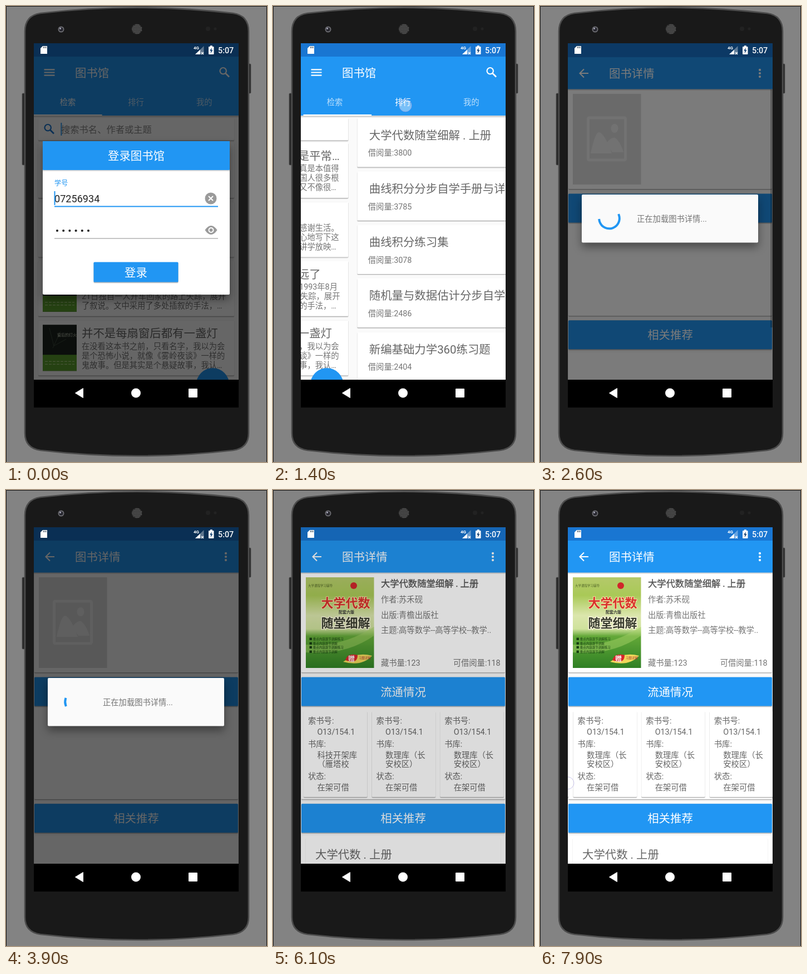
An HTML page that plays this animation: 469x820 px, repeating every 8 s.

```html
<!DOCTYPE html>
<html lang="zh-CN">
<head>
<meta charset="utf-8">
<title>图书馆</title>
<style>
html, body { margin: 0; width: 100%; height: 100%; overflow: hidden; background: #838383; }
svg { display: block; width: 100vw; height: 100vh; }
text { font-family: Roboto, "Noto Sans CJK SC", "Noto Sans CJK", sans-serif; white-space: pre; }
.dialog { filter: drop-shadow(0 8px 8px rgba(0, 0, 0, .4)); }
</style>
</head>
<body>
<svg id="stage" viewBox="0 0 469 820" xmlns="http://www.w3.org/2000/svg"></svg>
<script>
const BLUE = '#2196f3', DARK = '#1976d2', GREY = '#757575', INK = '#666';
const PAGE = 368, STEP = 122.6;

// ---- drawing helpers
const rect = (x, y, w, h, fill, extra = '') =>
  `<rect x="${x}" y="${y}" width="${w}" height="${h}" fill="${fill}" ${extra}/>`;
const circle = (x, y, r, fill, extra = '') =>
  `<circle cx="${x}" cy="${y}" r="${r}" fill="${fill}" ${extra}/>`;
const path = (d, fill, extra = '') => `<path d="${d}" fill="${fill}" ${extra}/>`;
const line = (d, color, width, extra = '') =>
  path(d, 'none', `stroke="${color}" stroke-width="${width}" ${extra}`);
// cy is the optical middle of the line of text
const text = (x, cy, size, fill, str, extra = '') =>
  `<text x="${x}" y="${cy + size * .38}" font-size="${size}" fill="${fill}" ${extra}>${str}</text>`;
const MID = 'text-anchor="middle"';
const group = (id, body, extra = '') => `<g id="${id}" ${extra}>${body}</g>`;
const card = (x, y, w, h, fill = '#fff') =>
  rect(x - .4, y + .4, w + .8, h + 1.8, '#000', 'rx="2" opacity=".1"') +
  rect(x, y + .4, w, h + .8, '#000', 'rx="2" opacity=".2"') +
  rect(x, y, w, h, fill, 'rx="1.5"');
const lens = (x, y, color) =>
  circle(x - 2.3, y - 2.3, 5.7, 'none', `stroke="${color}" stroke-width="2.2"`) +
  line(`M${x + 2},${y + 2}l6.5,6.5`, color, 2.6);
const times = (n, draw) => Array.from({ length: n }, (_, i) => draw(i)).join('');

// ---- phone
function phone() {
  let holes = '';
  for (let i = -3; i <= 3; i++)
    for (let j = -3; j <= 3; j++)
      if (i * i + j * j < 11) holes += circle(235 + i * 2.5 + (j & 1), 41.5 + j * 2.5, .8, '#777');
  return rect(0, 0, 469, 820, '#838383') +
    line('M.5,820V.5H468.5V820', '#111', 1) +
    rect(29, 157, 5, 129, '#2a2a2a', 'rx="1.5" stroke="#555" stroke-width=".8"') +
    rect(435, 104, 5, 53, '#2a2a2a', 'rx="1.5" stroke="#555" stroke-width=".8"') +
    path('M34,46Q34,17 62,13Q235,-7 408,13Q436,17 436,46V768Q436,795 408,799Q235,819 62,799Q34,795 34,768Z',
      '#191919', 'stroke="#4c4c4c" stroke-width="2.6"') +
    circle(99, 42, 5.5, '#6b6b70') + circle(99, 42, 3.6, '#25252d') + circle(97.6, 40.5, 1.5, '#aab') +
    circle(235, 41.5, 9.5, '#303030') + holes +
    circle(363, 41, 4, '#222') + circle(376, 41, 2.6, '#222');
}

function system() {
  return path('M66,72H74V86H62V76Z', '#fff') +
    line('M67.5,73v3M69.8,73v3M72,73v3', '#345', 1) +
    text(337, 75.2, 8, '#fff', '4G', 'font-weight="700"') +
    path('M355.5,72V87H340Z', '#fff', 'opacity=".35"') + path('M349,78.5V87H340Z', '#fff') +
    line('M351,83l4,4m0,-4l-4,4', '#fff', 1.2) +
    rect(364, 73, 9.5, 14, '#fff', 'rx="1"') + rect(366.8, 71.2, 4, 2.5, '#fff') +
    path('M370,75l-4,5.6h2.4l-.8,4.6l4,-6h-2.4z', '#0d3c70') +
    text(381, 79.2, 14.3, '#fff', '5:07', 'font-weight="500"') +
    rect(50, 672, PAGE, 50, '#000') +
    path('M124.5,696L138.5,687.5V704.5Z', '#fff', 'stroke="#fff" stroke-linejoin="round"') +
    circle(233.5, 696, 8.5, '#fff') + rect(328, 688, 16, 16, '#fff', 'rx="1"');
}

// ---- library screen
const books = [
  ['原来安静才好，喧闹是平常…', '许久没有读到这样好看的书，真是本值得',
    '反复读的作品。书中写出了中国人很多根', '深蒂固的想法，读来轻松有趣又不像很…'],
  ['檐下闲谈', '作者用平实的语言写下日常，感谢生活。',
    '每篇都不长，却都真诚，他用心地写下这', '些文字，也记下多年来在各地讲学放映…'],
  ['那天傍晚她独自走太远了', '故事从一桩旧案说起，主角于1993年8月',
    '21日独自一人开车回家的路上失踪，展开', '了叙说。文中采用了多处插叙的手法，…'],
  ['并不是每扇窗后都有一盏灯', '在没看这本书之前，只看名字，我以为会',
    '是个恐怖小说，就像《雾岭夜谈》一样的', '鬼故事。但是其实是个悬疑故事，我认…']
];
const ranking = [
  ['大学代数随堂细解 . 上册', 3800], ['曲线积分分步自学手册与详解…', 3785],
  ['曲线积分练习集', 3078], ['随机量与数据估计分步自学手…', 2486], ['新编基础力学360练习题', 2404]
];

function bookCard([title, ...lines], i) {
  const y = 246 + i * 106.4;
  const cover = i < 2
    ? rect(66, y + 8, 61, 83, 'url(#plain)')
    : rect(66, y + 8, 61, 83, '#1c241d') + rect(66, y + 62, 61, 29, '#5da32c') +
      line(`M70,${y + 74}h53M70,${y + 79}h53`, '#a5cf7c', 1.5, 'stroke-dasharray="5 2"') +
      line(`M78,${y + 14}l8,32l22,-12M98,${y + 20}l-14,30`, '#3c4a3e', 1) +
      text(92, y + 26, 7, '#cfd6c4', '窗后的灯火');
  return card(58, y, 352, 99) + cover + text(136, y + 23, 20.4, INK, title) +
    lines.map((s, k) => text(136, y + 46 + k * 17, 14.3, GREY, s)).join('');
}

function rankCard([title, count], i) {
  const y = 201.5 + i * 96.2;
  return card(58, y, 352, 88) + text(79.5, y + 30.5, 20.4, INK, title) +
    text(77.5, y + 62.5, 14.3, GREY, '借阅量:' + count);
}

function mainScreen() {
  const search = card(58, 201.5, 352, 40) + lens(77.5, 221, DARK) +
    rect(98.5, 210, 1.8, 23, BLUE) + text(99, 222, 16.3, '#8a8a8a', '搜索书名、作者或主题');
  const fab = circle(371.5, 682, 29.6, '#000', 'opacity=".2"') + circle(371.5, 680.6, 29.6, BLUE);
  const tabs = ['检索', '排行', '我的'].map((s, i) =>
    text(111 + i * STEP, 173, 14.3, '#fff', s, `${MID} class="tab"`)).join('');
  return rect(50, 67, PAGE, 605, '#fafafa') +
    group('pager',
      search + books.map(bookCard).join('') + fab +
      group('rank', rect(50, 197, PAGE, 475, '#fafafa') + ranking.map(rankCard).join(''),
        `transform="translate(${PAGE} 0)"`)) +
    rect(50, 197, PAGE, 3, '#000', 'opacity=".15"') +
    rect(50, 67, PAGE, 24.5, DARK) + rect(50, 91, PAGE, 106, BLUE) +
    line('M68.5,114.4h19M68.5,119.5h19M68.5,124.6h19', '#fff', 2.1) +
    text(124, 120, 20.4, '#fff', '图书馆') + lens(392.5, 119, '#fff') + tabs +
    rect(50, 195, STEP, 2.2, '#fff', 'id="marker"');
}

// ---- detail screen
function cover() {
  return rect(59, 157, 122.5, 163, 'url(#green)') +
    path('M59,278Q122,284 181.5,246V262Q130,298 59,292Z', '#a4d267', 'opacity=".5"') +
    text(63, 172, 5.5, '#55682a', '大学课程学习辅导') +
    circle(145, 172, 6, '#d0262b') +
    text(130.5, 203, 22, '#d8322c', '大学代数',
      `${MID} font-weight="900" stroke="#f3e3a4" stroke-width="2" paint-order="stroke"`) +
    text(132, 219, 7, '#333', '配套六版', `${MID} font-weight="700"`) +
    text(130.5, 239, 22, '#3a3d30', '随堂细解',
      `${MID} font-weight="900" stroke="#f6f4d8" stroke-width="3" paint-order="stroke"`) +
    times(4, i => text(65, 268 + i * 7.5, 5.5, '#163d10', '■ 重点内容逐节讲解' + (i & 1 ? '' : '练习'))) +
    path('M126,309Q150,290 178,298Q160,318 126,309Z', '#f0d75a') +
    path('M130,306Q134,292 152,297Q152,314 130,306Z', '#d8262a') +
    text(141, 303.5, 12, '#fff', '赠', `${MID} font-weight="700"`) +
    text(154, 302, 5.5, '#a33', '习题详解');
}

function copyCard(i) {
  const x = 55 + i * STEP;
  const store = i ? ['数理库（长', '安校区）'] : ['科技开架库', '（雁塔校'];
  const rows = [[8, 415, '索书号:'], [24.5, 435, 'O13/154.1'], [8, 457, '书库:'], [24.5, 477, store[0]],
    [24.5, 493, store[1]], [8, 515, '状态:'], [24.5, 535, '在架可借']];
  return card(x, 398, 114.5, 154) + rows.map(([dx, y, s]) => text(x + dx, y, 14.3, INK, s)).join('');
}

const banner = (y, s) => card(51, y, 366, 52, BLUE) + text(234, y + 26.5, 20.4, '#fff', s, MID);

function detailScreen() {
  const blank = rect(59, 157, 122.5, 163, '#dcdcdc') +
    rect(86.5, 200, 67, 76, 'none', 'stroke="#eee" stroke-width="5" rx="2"') +
    '<ellipse cx="134" cy="219" rx="6.5" ry="8" fill="#eee"/>' +
    path('M91,264Q99,226 106,226Q116,228 129,264Z M119,246Q128,234 135,236Q145,244 150,262H130Z', '#eee');
  const info = [[197, '作者:苏禾砚'], [225, '出版:青檐出版社'], [252, '主题:高等数学--高等学校--教学..'], [311, '藏书量:123']];
  const full = cover() +
    text(194, 168, 16.3, '#555', '大学代数随堂细解 . 上册', 'stroke="#555" stroke-width=".4"') +
    info.map(([y, s]) => text(194, y, 14.3, GREY, s)).join('') +
    text(408.5, 311, 14.3, GREY, '可借阅量:118', 'text-anchor="end"') +
    group('copies', times(10, copyCard)) +
    card(59, 626, 350, 70) + text(76, 655.5, 20.4, INK, '大学代数 . 上册');
  return rect(50, 67, PAGE, 660, '#fafafa') +
    card(51, 150, 366, 178) + card(51, 380, 366, 176) + card(51, 622, 366, 90) +
    banner(336.5, '流通情况') + banner(564.2, '相关推荐') +
    group('blank', blank) + group('full', full) +
    rect(414, 149, 4, 428, '#000', 'id="bar"') +
    rect(50, 148, PAGE, 2.5, '#000', 'opacity=".15"') +
    rect(50, 67, PAGE, 24.5, DARK) + rect(50, 91, PAGE, 57.5, BLUE) +
    line('M87,120H71.5M79,112.5l-7.5,7.5l7.5,7.5', '#fff', 2.1) +
    text(124, 120, 20.4, '#fff', '图书详情') +
    times(3, i => circle(395, 113.9 + i * 6.1, 2.1, '#fff'));
}

// ---- dialogs
function loginDialog() {
  return rect(66, 243, 336, 276, '#fff', 'rx="2" class="dialog"') +
    rect(66, 295, 336, 2, '#000', 'opacity=".15"') + rect(66, 243, 336, 52, BLUE, 'rx="1"') +
    text(234, 269.5, 20.4, '#fff', '登录图书馆', MID) +
    text(87, 318, 12.2, BLUE, '学号') + text(87, 346, 18.1, '#222', '07256934') +
    rect(86.5, 333, 2, 25, BLUE, 'id="caret"') + rect(87, 359.5, 294, 2, BLUE) +
    circle(368, 346, 10.5, '#9a9a9a') + line('M364,342l8,8m0,-8l-8,8', '#fff', 2) +
    times(6, i => circle(92 + i * 11.2, 404, 2.1, '#222')) +
    rect(87, 417.5, 294, 1, '#8c8c8c') +
    path('M357.5,403Q368.5,387 379.5,403Q368.5,419 357.5,403Z', '#9a9a9a') +
    circle(368.5, 403, 5, '#fff') + circle(368.5, 403, 3, '#9a9a9a') +
    card(157.5, 460.5, 152, 36, BLUE) + text(233.5, 479, 20.4, '#fff', '登录', MID);
}

function loadingDialog() {
  return rect(75, 338, 317, 86.5, '#fafafa', 'rx="2" class="dialog"') +
    circle(124.5, 381, 18.3, 'none',
      `id="spin" stroke="${BLUE}" stroke-width="4" stroke-linecap="square" pathLength="360"`) +
    text(174, 382, 14.3, GREY, '正在加载图书详情...');
}

const stops = list => list.map(([at, color]) => `<stop offset="${at}" stop-color="${color}"/>`).join('');
const stage = document.getElementById('stage');
stage.innerHTML = `<defs>
  <clipPath id="screen">${rect(50, 67, PAGE, 605, '#000')}</clipPath>
  <linearGradient id="green" x2="0" y2="1">${stops([[0, '#b4c96a'], [.2, '#a9c957'], [.42, '#dbe6ac'],
    [.57, '#cfe29c'], [.65, '#63a838'], [1, '#2f8024']])}</linearGradient>
  <linearGradient id="plain" x2="0" y2="1">${stops([[0, '#ece6d6'], [1, '#cfc9b8']])}</linearGradient>
  </defs>` + phone() +
  group('app',
    group('main', mainScreen()) + group('detail', detailScreen()) +
    rect(50, 67, PAGE, 605, '#000', 'id="dim"') +
    group('login', loginDialog()) + group('loading', loadingDialog()) +
    circle(0, 0, 11, '#fff', 'id="finger" fill-opacity=".4" stroke="#a9a0e0" stroke-opacity=".6"'),
    'clip-path="url(#screen)"') + system();

// ---- motion
const ids = {};
stage.querySelectorAll('[id]').forEach(e => ids[e.id] = e);
const tabs = stage.querySelectorAll('.tab');
const set = (id, name, value) => ids[id].setAttribute(name, value);
const move = (id, x, y) => set(id, 'transform', `translate(${x} ${y})`);
const fade = (id, a) => {
  set(id, 'opacity', a);
  set(id, 'display', a > 0 ? 'inline' : 'none');
};
const clamp = x => Math.min(1, Math.max(0, x));
const span = (t, from, to) => clamp((t - from) / (to - from));

// linear track through [time, value] points
function track(t, ...pts) {
  let i = 0;
  while (i < pts.length - 2 && t > pts[i + 1][0]) i++;
  const [a, b] = [pts[i], pts[i + 1]];
  return a[1] + (b[1] - a[1]) * span(t, a[0], b[0]);
}

// cubic-bezier(.4, 0, .2, 1)
function ease(x) {
  x = clamp(x);
  let lo = 0, hi = 1;
  for (let i = 0; i < 24; i++) {
    const p = (lo + hi) / 2, q = 1 - p;
    if (1.2 * q * q * p + .6 * q * p * p + p * p * p < x) lo = p; else hi = p;
  }
  return lo * lo * (3 - 2 * lo);
}

function spinner(t) {
  const phase = track(t, [2400, .09], [2600, .225], [3900, 1.1], [5900, 2.92], [6000, 3]);
  const turn = track(t, [2400, 8], [2600, 18], [3900, 83], [5900, 212]);
  const n = Math.floor(phase), u = phase - n;
  const tail = ease(2 * u - 1), head = ease(2 * u);
  set('spin', 'stroke-dasharray', `${270 * (head - tail) + .1} 400`);
  set('spin', 'transform', `rotate(${270 * tail + 234 * u + 144 * n + turn - 90} 124.5 381)`);
}

const flung = t => 431 * (1 - (1 - span(t, 6650, 7500)) ** 3);
const dragged = t => 300 * span(t, 7550, 7900);

function finger(t) {
  if (t >= 500 && t < 600) return [234, 479];
  if (t >= 1300 && t < 1500) return [238, 179];
  if (t >= 2100 && t < 2200) return [235, 246];
  if (t >= 6700 && t < 7000) return [360 - flung(t), 516];
  if (t >= 7600) return [350 - dragged(t), track(t, [7550, 542], [7900, 527])];
}

function draw(t) {
  fade('caret', t < 300 ? 1 : 0);
  fade('login', 1 - span(t, 540, 760));
  fade('dim', t < 2000 ? .6 * (1 - span(t, 560, 900))
    : track(t, [2400, 0], [2632, .6], [5940, .6], [6150, 0]));

  const swipe = 1 - (1 - span(t, 1280, 1780)) ** 5;
  move('pager', -PAGE * swipe, 0);
  set('marker', 'x', 50 + STEP * ease(span(t, 1365, 1665)));
  tabs.forEach((e, i) => e.setAttribute('opacity', i === (t < 1300 ? 0 : 1) ? 1 : .7));

  const slide = 52 * (1 - span(t, 2250, 2650)) ** 1.9;
  fade('detail', span(t, 2150, 2450));
  move('detail', 0, slide);
  fade('bar', .25 * track(t, [2850, 1], [3150, 0]));
  fade('blank', t < 5950 ? 1 : 0);
  fade('full', t < 5950 ? 0 : 1);
  move('copies', -flung(t) - dragged(t), 0);

  fade('loading', track(t, [2400, 0], [2550, 1], [5920, 1], [6060, 0]));
  move('loading', 0, slide);
  spinner(t);

  const at = finger(t);
  fade('finger', at ? 1 : 0);
  if (at) move('finger', ...at);
}

// the screen refreshes ten times a second
function tick() {
  draw(Math.floor(performance.now() % 8000 / 100) * 100);
  requestAnimationFrame(tick);
}
tick();
</script>
</body>
</html>
```
